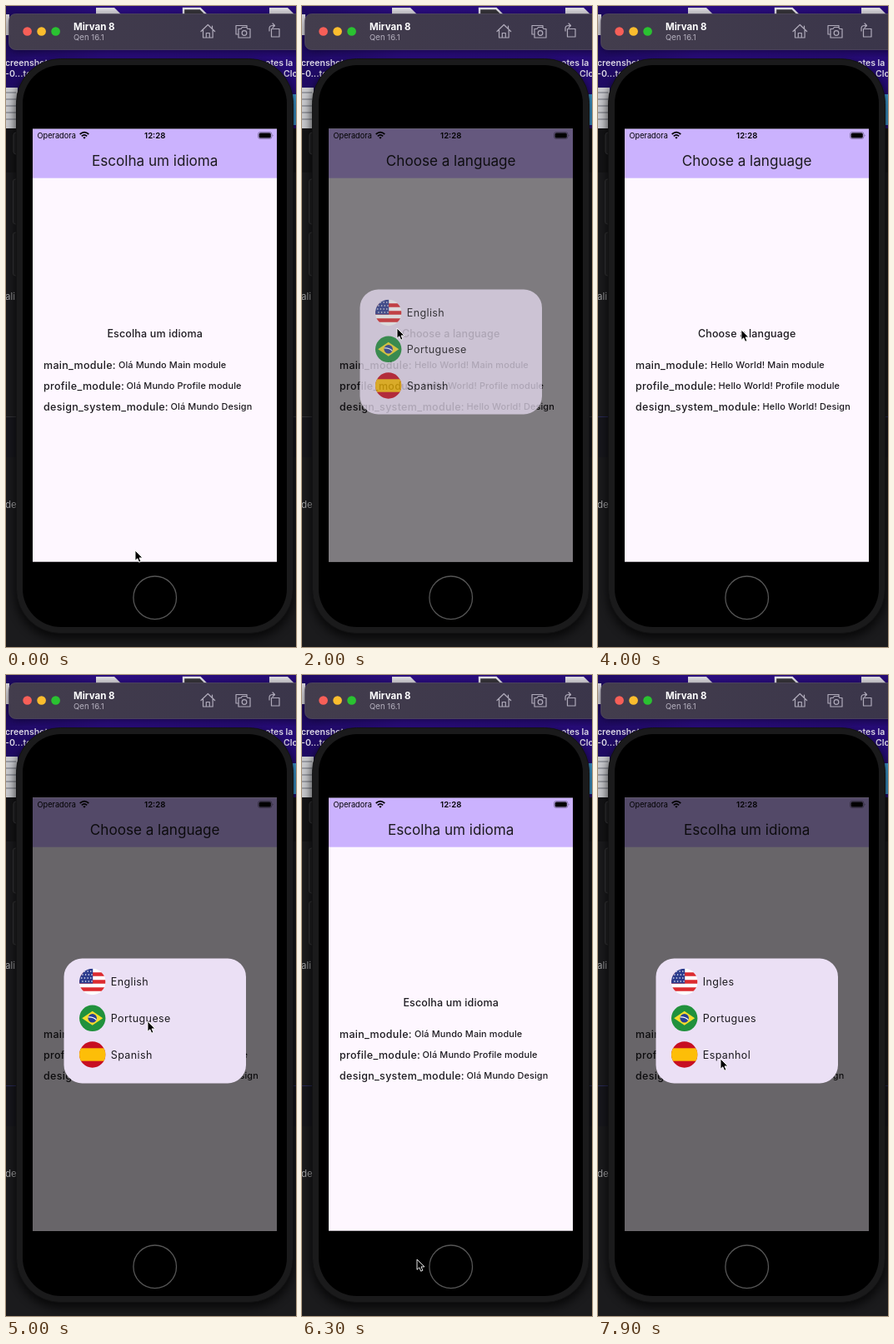
Recreate the animation shown at these times as an HTML page. Size 348 by 770 pixels, loop 8000 ms.

```html
<!DOCTYPE html>
<html lang="pt">
<head>
<meta charset="utf-8">
<title>Language picker</title>
<style>
  html, body { margin: 0; width: 100%; height: 100%; overflow: hidden; background: #1b1b1d; }
  svg { display: block; width: 348px; height: 770px; font-family: Inter, "Open Sans", sans-serif; }
  text { white-space: pre; }
  .mid { text-anchor: middle; }
  .ink { fill: #1d1b20; }
  .title { font-size: 17.1px; }
  .button { font-size: 12.5px; font-weight: 500; letter-spacing: .16px; }
  .key { font-size: 12.5px; font-weight: 500; letter-spacing: .3px; }
  .value { font-size: 10.9px; font-weight: 500; letter-spacing: .14px; }
  .option { font-size: 12.5px; letter-spacing: .39px; }
  .file { font-size: 10.5px; font-weight: 600; fill: #dcd8e6; }
  .code { font-size: 11.5px; fill: #a3a3a5; }
  .icon { fill: none; stroke: #b0abbb; stroke-width: 1.2; stroke-linejoin: round; stroke-linecap: round; }
</style>
</head>
<body>
<svg viewBox="0 0 348 770">
  <defs>
    <linearGradient id="sky" x2="1" y2="0">
      <stop offset="0" stop-color="#1e0a62"/><stop offset=".35" stop-color="#2b0d80"/><stop offset="1" stop-color="#250b74"/>
    </linearGradient>
    <linearGradient id="bar" x2="1" y2="0">
      <stop offset="0" stop-color="#433d4d"/><stop offset="1" stop-color="#3a354a"/>
    </linearGradient>
    <filter id="soft" x="-20%" y="-20%" width="140%" height="140%"><feGaussianBlur stdDeviation="6"/></filter>
    <clipPath id="disc"><circle r="15.7"/></clipPath>
  </defs>

  <!-- desktop and editor -->
  <rect width="348" height="770" fill="#1b1b1d"/>
  <rect width="348" height="147" fill="url(#sky)"/>
  <path d="M108 2h22l8 8v4h-30zM316 2h22l8 8v4h-30z" fill="#d6d4da"/>
  <path d="M213 3h20l8 8v4h-28z" fill="#353339" stroke="#dedce2" stroke-width="2.4"/>
  <rect y="10" width="4" height="25" fill="#d8d6dc"/>
  <text class="file" x="-1" y="71.500">creenshot</text>
  <text class="file" x="-1" y="84.500">-0...tes</text>
  <text class="file" x="311" y="71.500">otes la</text>
  <text class="file" x="333" y="84.500">Clo</text>
  <rect y="98" width="14" height="49" fill="#c9cace"/>
  <path d="M0 104h12M0 112h12M0 120h12M0 128h12M0 136h12" stroke="#9a9ca3" stroke-width="2"/>
  <rect x="343" y="106" width="5" height="37" fill="#3f9fd8"/>
  <rect y="147" width="348" height="53" fill="#141416"/>
  <g fill="#222224" stroke="#38383a">
    <rect x="9" y="152" width="30" height="26" rx="3"/>
    <rect x="8.500" y="208" width="30" height="54" rx="3"/>
    <rect x="8.500" y="272" width="30" height="52" rx="3"/>
  </g>
  <text class="code" x="-1" y="353">ali.</text>
  <rect y="494" width="348" height="48" fill="#17171d"/>
  <path id="rule" d="M0 493.500H348"/>
  <text class="code" x="-1" y="603">de</text>

  <!-- device -->
  <rect x="11" y="68" width="335" height="692" rx="54" opacity=".7" filter="url(#soft)"/>
  <rect x="12.500" y="63.500" width="332" height="690" rx="53" fill="#1a1a1b" stroke="#121213"/>
  <rect x="20" y="71" width="317" height="675" rx="46"/>
  <circle cx="178.700" cy="710.800" r="25.800" fill="none" stroke="#565656" stroke-width="1.300"/>

  <!-- window bar -->
  <rect x="4" y="13" width="360" height="40" rx="9" opacity=".6" filter="url(#soft)"/>
  <rect x="3.500" y="9.500" width="360" height="43" rx="8" fill="url(#bar)" stroke="#565062" stroke-width=".7"/>
  <circle cx="25.600" cy="30.500" r="5.300" fill="#f75f58"/>
  <circle cx="42.600" cy="30.500" r="5.300" fill="#fbbd2e"/>
  <circle cx="59.600" cy="30.500" r="5.300" fill="#2ac231"/>
  <text x="81" y="28.700" font-size="11.500" font-weight="700" fill="#fff">Mirvan 8</text>
  <text x="81" y="41" font-size="9.600" fill="#b5b0be">Qen 16.1</text>
  <path class="icon" d="M234 30.500l8.300-8 8.300 8M236.500 29v9h11.600v-9M240.300 38v-5.500h4V38M247.500 24v3"/>
  <path class="icon" d="M278.500 34h-2.500V23.500h13v2.500M279 27.500h3l1.500-2h5l1.500 2h3V38h-14z"/>
  <circle class="icon" cx="286" cy="32.500" r="2.800"/>
  <path class="icon" d="M318.500 27.500h9.500V37h-9.500zM316 30v-3q0-3.500 4-3.500h2M320 21l2.500 2.500L320 26"/>

  <!-- app screen -->
  <rect x="32" y="147.700" width="293" height="520" fill="#fef7ff"/>
  <rect x="32" y="147.700" width="293" height="59" fill="#cbb2fe"/>
  <text x="37.500" y="159" font-size="9.200">Operadora</text>
  <g fill="none" stroke="#000" stroke-width="1.700">
    <path d="M88.700 154q5.300-4.700 10.600 0M90.800 156.300q3.200-2.700 6.400 0"/>
  </g>
  <path d="M92.300 157.800q1.700-1.200 3.400 0L94 159.800z"/>
  <text class="mid" x="178.700" y="159" font-size="9.600" font-weight="600">12:28</text>
  <rect x="302.500" y="151.500" width="16.400" height="8" rx="2.400" fill="none" stroke="#000" stroke-opacity=".4" stroke-width=".8"/>
  <rect x="303.600" y="152.600" width="14.200" height="5.800" rx="1.500"/>
  <path d="M319.800 154.200q1.600 1.300 0 2.700z" opacity=".5"/>
  <text class="title ink mid" id="title" x="178.700" y="191.500"></text>
  <text class="button ink mid" id="button" x="178.700" y="398.300"></text>
  <g id="rows"></g>
  <rect id="barrier" x="32" y="147.700" width="293" height="520"/>

  <!-- dialog -->
  <g id="dialog">
    <rect x="69.500" y="340.500" width="218.500" height="150" rx="22" fill="#ebe0f5"/>
    <g transform="translate(103.700 368.500)">
      <g clip-path="url(#disc)">
        <rect x="-16" y="-16" width="32" height="32" fill="#fff"/>
        <path d="M-16-9H16M-16 0H16M-16 9H16" stroke="#dc2b30" stroke-width="4.500"/>
        <rect x="-16" y="-16" width="16.500" height="18" fill="#2c3b8d"/>
        <g id="stars" fill="#fff"></g>
      </g>
    </g>
    <g transform="translate(103.700 412.300)">
      <circle r="15.700" fill="#21913d"/>
      <path d="M-12.500 0L0-8.500 12.500 0 0 8.500z" fill="#f6dc2d"/>
      <circle r="5.200" fill="#293f94"/>
      <path d="M-4.900-1.300Q1-1.800 4.700 2" fill="none" stroke="#fff" stroke-width="1.200"/>
    </g>
    <g transform="translate(103.700 456)" clip-path="url(#disc)">
      <rect x="-16" y="-16" width="32" height="32" fill="#c70f22"/>
      <rect x="-16" y="-7.700" width="32" height="15.400" fill="#fdbe08"/>
    </g>
  </g>
  <path id="cursor" d="M0 0V12.300L2.800 9.800 4.700 14.200 6.900 13.200 5 8.900H8.900Z" stroke="#fff" stroke-width=".9" stroke-linejoin="round"/>
</svg>
<script>
const LOOP = 8000, STEP = 100;
const $ = id => document.getElementById(id);

const texts = {
  pt: { title: 'Escolha um idioma', hello: 'Olá Mundo', options: ['Ingles', 'Portugues', 'Espanhol'] },
  en: { title: 'Choose a language', hello: 'Hello World!', options: ['English', 'Portuguese', 'Spanish'] }
};
const modules = [
  ['main_module:', 'Main module', 135],
  ['profile_module:', 'Profile module', 144.6],
  ['design_system_module:', 'Design', 197.6]
];
const english = [1900, 5300];
const dialogs = [[250, 1930], [4620, 5330], [7430, Infinity]];

// time, x, y of the pointer tip
const path = [
  [0, 155, 654], [100, 156, 658], [300, 168, 402], [500, 166, 398], [700, 166, 398],
  [800, 118, 609.5], [1500, 128, 374], [1700, 128, 374], [1900, 127, 370], [2000, 114, 387],
  [2500, 31, 643], [3500, 31, 643], [4000, 172, 389], [4400, 172, 389], [5000, 170, 416],
  [5900, 170, 416], [6300, 138, 702], [6500, 138, 702], [7100, 152, 397], [7200, 152, 397],
  [7900, 147, 461], [LOOP, 147, 461]
];

function add(parent, tag, attrs) {
  const el = document.createElementNS('http://www.w3.org/2000/svg', tag);
  for (const name in attrs) el.setAttribute(name, attrs[name]);
  return parent.appendChild(el);
}
const addText = (parent, style, x, y) => add(parent, 'text', { class: style + ' ink', x, y });

const values = modules.map(([key, , x], i) => {
  const y = 435.6 + 25 * i;
  addText($('rows'), 'key', 45, y).textContent = key;
  return addText($('rows'), 'value', x, y - 0.4);
});
const options = [0, 1, 2].map(i => addText($('dialog'), 'option', 125.8, 373.3 + 43.7 * i));

for (let r = 0; r < 4; r++) for (let c = 0; c < 4; c++)
  add($('stars'), 'circle', { cx: -13 + 3.7 * c + (r % 2) * 1.2, cy: -12.5 + 4 * r, r: 0.8 });

const clamp = v => Math.max(0, Math.min(1, v));
const ease = v => v * v * (3 - 2 * v);

function pointer(t) {
  const i = path.findIndex(p => p[0] > t);
  const [t0, x0, y0] = path[i - 1], [t1, x1, y1] = path[i];
  const k = ease((t - t0) / (t1 - t0));
  return [x0 + (x1 - x0) * k, y0 + (y1 - y0) * k];
}

const fade = t => Math.max(...dialogs.map(([from, to]) =>
  Math.min(clamp((t - from) / 170), clamp(1 - (t - to) / 250))));

let shown;
function setLanguage(lang) {
  if (lang === shown) return;
  shown = lang;
  const { title, hello, options: names } = texts[lang];
  $('title').textContent = $('button').textContent = title;
  values.forEach((el, i) => el.textContent = hello + ' ' + modules[i][1]);
  options.forEach((el, i) => el.textContent = names[i]);
}

function draw(t) {
  const open = fade(t);
  setLanguage(t >= english[0] && t < english[1] ? 'en' : 'pt');
  $('dialog').setAttribute('opacity', open);
  $('barrier').setAttribute('opacity', 0.59 * Math.sqrt(open));
  $('rule').setAttribute('stroke', t < 2500 ? '#343438' : '#292a58');
  $('cursor').setAttribute('transform', `translate(${pointer(t)})`);
}

const start = performance.now();
function tick() {
  const t = (performance.now() - start) % LOOP;
  draw(Math.floor(t / STEP) * STEP);
  requestAnimationFrame(tick);
}
tick();
</script>
</body>
</html>
```
